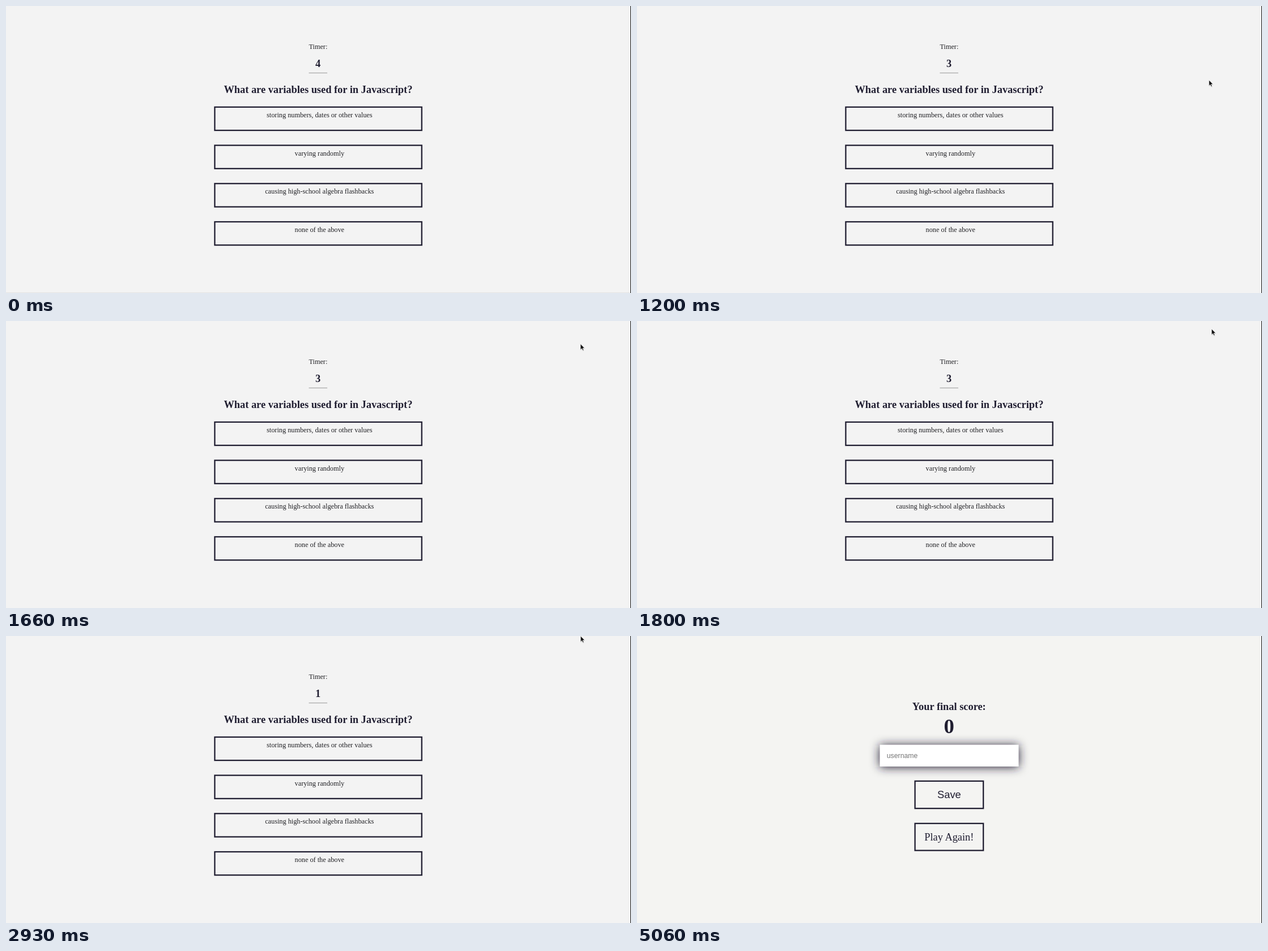
An HTML page that plays this animation: 1103x508 px, repeating every 7.06 s.

```html
<!DOCTYPE html>
<html lang="en">
<head>
<meta charset="utf-8">
<title>Quiz timer</title>
<style>
  html, body { margin: 0; width: 100%; height: 100%; overflow: hidden; background: #f3f3f3; }
  svg { display: block; width: 100%; height: 100%; }
  text { font: 12.25px "Liberation Serif", "Times New Roman", serif; fill: #222226; text-anchor: middle; }
  .big { font-size: 18.375px; fill: #201e31; }
  .bold { font-weight: 700; }
  .sans { font-family: "Liberation Sans", Arial, sans-serif; }
  .box { fill: none; stroke: #201e31; stroke-width: 2.3px; }
</style>
</head>
<body>
<svg viewBox="0 0 1103 508" xmlns="http://www.w3.org/2000/svg">
  <defs>
    <filter id="blur" x="-20%" y="-100%" width="140%" height="300%">
      <feGaussianBlur stdDeviation="8.6"/>
    </filter>
  </defs>
  <rect id="page" width="1103" height="508"/>

  <g id="quiz">
    <text x="550.9" y="76.2">Timer:</text>
    <text id="count" class="big bold" x="550.7" y="107.6"></text>
    <rect x="534.5" y="117.8" width="32.5" height="1.4" fill="#adadad"/>
    <text class="big bold" x="550.9" y="154.2">What are variables used for in Javascript?</text>
    <g id="options"></g>
    <rect id="footer" y="507" width="1103" height="1" fill="#e2e2e2"/>
    <g id="cursor">
      <path d="M0 0V10.4L2.4 8.2 4 11.8 5.7 11 4.2 7.6H7.4Z" fill="#000" opacity=".15" transform="translate(.6 1.2)"/>
      <path d="M0 0V10.4L2.4 8.2 4 11.8 5.7 11 4.2 7.6H7.4Z" fill="#111" stroke="#fff" stroke-width=".7"/>
    </g>
  </g>

  <g id="result">
    <text class="big bold" x="550.8" y="131.4">Your final score:</text>
    <text class="big bold" x="550.8" y="172.4" style="font-size:36.75px">0</text>
    <rect x="428.5" y="193.7" width="245" height="38.3" fill="#201e31" filter="url(#blur)"/>
    <rect x="428.5" y="192.5" width="245" height="38.5" fill="#fff"/>
    <text class="sans" x="440.8" y="215.6" style="text-anchor:start;fill:#757575">username</text>
    <rect class="box" x="490.6" y="256.8" width="120.6" height="48.4"/>
    <text class="big sans" x="550.9" y="287.2">Save</text>
    <rect class="box" x="490.6" y="331.8" width="120.6" height="47.8"/>
    <text class="big" x="550.8" y="361.7">Play Again!</text>
  </g>

  <rect x="1102" width="1" height="508" fill="#111"/>
</svg>
<script>
  const LOOP = 7060, RESULT_AT = 5060;
  const TICKS = [930, 1930, 2930, 3930];
  // Pointer stops: time, x, y
  const STOPS = [
    [1200, 1009.3, 131], [1260, 1009.8, 118], [1460, 1011, 106],
    [1530, 1012.3, 86], [1600, 1013.3, 62], [1660, 1013.8, 40.5],
    [1730, 1014, 14], [1930, 1014, 0]
  ];
  const POINTER_END = 3930;
  const OPTIONS = [
    "storing numbers, dates or other values",
    "varying randomly",
    "causing high-school algebra flashbacks",
    "none of the above"
  ];
  const $ = id => document.getElementById(id);
  const show = (id, on) => $(id).setAttribute("display", on ? "inline" : "none");

  $("options").innerHTML = OPTIONS.map((label, i) => {
    const y = 178.9 + 67.7 * i;
    return `<rect class="box" x="368.4" y="${y}" width="365.3" height="41.2"/>` +
      `<text x="553.3" y="${y + 17.9}">${label}</text>`;
  }).join("");

  function draw(t) {
    const done = t >= RESULT_AT;
    show("quiz", !done);
    show("result", done);
    show("footer", t < TICKS[0]);
    $("page").setAttribute("fill", done ? "#f4f4f2" : "#f3f3f3");
    $("count").textContent = 4 - TICKS.filter(at => t >= at).length;

    const stop = STOPS.filter(s => t >= s[0]).pop();
    show("cursor", stop && t < POINTER_END);
    if (stop) $("cursor").setAttribute("transform", `translate(${stop[1]} ${stop[2]})`);
  }

  const start = performance.now();
  function tick() {
    draw((performance.now() - start) % LOOP);
    requestAnimationFrame(tick);
  }
  tick();
</script>
</body>
</html>
```
